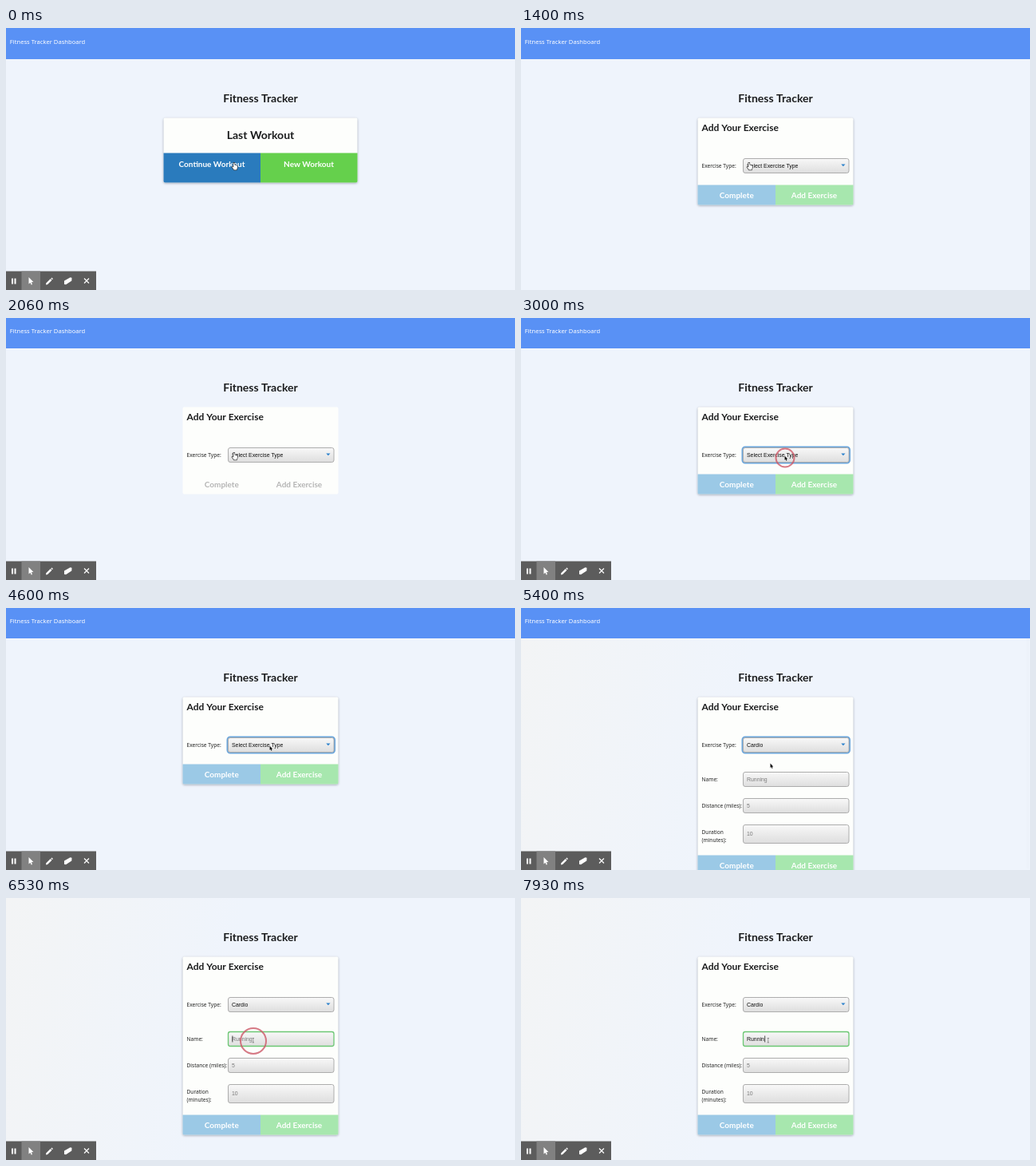
An HTML page with a canvas that plays this animation: 638 by 328 pixels, repeating every 8 s.

```html
<!DOCTYPE html>
<html lang="en">
<head>
<meta charset="utf-8">
<title>Fitness Tracker</title>
<style>
  html, body { margin: 0; width: 100%; height: 100%; overflow: hidden; background: #eff4fc; }
  canvas { display: block; width: 638px; height: 328px; }
</style>
</head>
<body>
<canvas id="stage" width="638" height="328"></canvas>
<script>
const LOOP = 8000;
const LATO = 'Lato, sans-serif';
const LABEL = '"Noto Sans", sans-serif';
const FIELD = '"Liberation Sans", Arial, sans-serif';

// Moments of the story, in ms
const EXERCISE_PAGE = 1330, RELOAD = 2060, FOCUS_SELECT = 2930, PICK_CARDIO = 4860,
      SCROLL = 5400, FOCUS_NAME = 6400;
const KEYS = [7000, 7200, 7400, 7530, 7730, 7860];
const CLICKS = [[720, 287, 173], [FOCUS_SELECT, 331, 175], [FOCUS_NAME, 310, 179]];

const canvas = document.getElementById('stage');
const ctx = canvas.getContext('2d');

const clamp01 = v => Math.max(0, Math.min(1, v));
const progress = (t, from, to) => clamp01((t - from) / (to - from));
const ease = p => p * p * (3 - 2 * p);
const mix = (a, b, p) => a + (b - a) * p;

function rect(x, y, w, h, fill) {
  ctx.fillStyle = fill;
  ctx.fillRect(x, y, w, h);
}

function rounded(x, y, w, h, r) {
  ctx.beginPath();
  ctx.roundRect(x, y, w, h, r);
}

function poly(points, fill, stroke, width = 1) {
  ctx.beginPath();
  points.forEach(([x, y]) => ctx.lineTo(x, y));
  ctx.closePath();
  if (stroke) {
    ctx.strokeStyle = stroke;
    ctx.lineWidth = width;
    ctx.stroke();
  }
  if (fill) {
    ctx.fillStyle = fill;
    ctx.fill();
  }
}

// Draws text whose capitals are centred on y
function text(str, x, y, size, family, color, { weight = 400, align = 'left' } = {}) {
  ctx.font = `${weight} ${size}px ${family}`;
  ctx.textAlign = align;
  ctx.fillStyle = color;
  ctx.fillText(str, x, y + size * 0.36);
}

const heading = (str, x, y, size, color = '#1b1c1d', align = 'center') =>
  text(str, x, y, size, LATO, color, { weight: 700, align });

function card(x, y, w, h, shadow) {
  ctx.save();
  if (shadow > 0) {
    ctx.shadowColor = `rgba(60,70,90,${0.45 * shadow})`;
    ctx.shadowBlur = 3;
    ctx.shadowOffsetY = 1;
  }
  rounded(x, y, w, h, 2);
  ctx.fillStyle = '#fdfefc';
  ctx.fill();
  ctx.restore();
}

function buttonPair(x, y, w, h, left, right) {
  ctx.fillStyle = left;
  rounded(x, y, w / 2, h, [0, 0, 0, 2]);
  ctx.fill();
  ctx.fillStyle = right;
  rounded(x + w / 2, y, w / 2, h, [0, 0, 2, 0]);
  ctx.fill();
}

function field(y, h, value, color, focus) {
  const x = 278.5, w = 132.5;
  if (focus === 'blue') {
    rounded(x - 1, y - 1, w + 2, h + 2, 3.5);
    ctx.strokeStyle = '#6ba6dc';
    ctx.lineWidth = 2;
    ctx.stroke();
  }
  const shade = ctx.createLinearGradient(0, y, 0, y + h);
  shade.addColorStop(0, '#f8f8f8');
  shade.addColorStop(1, '#dedede');
  rounded(x, y, w, h, 2.5);
  ctx.fillStyle = shade;
  ctx.fill();
  ctx.strokeStyle = focus === 'green' ? '#6cc774' : '#adadad';
  ctx.lineWidth = focus === 'green' ? 1.3 : 1;
  ctx.stroke();
  text(value, 283, y + h / 2, 6.9, FIELD, color);
}

const label = (str, y) => text(str, 226.5, y, 6.6, LABEL, '#222');

function homePage() {
  card(197.5, 112.5, 243, 81, 1);
  heading('Last Workout', 319, 133.5, 14);
  buttonPair(197.5, 156.5, 243, 37, '#2a7bbd', '#65d04c');
  heading('Continue Workout', 258, 170, 10, '#fff');
  heading('New Workout', 379.5, 170, 10, '#fff');
}

function cardioFields(t) {
  const typed = 'Runnin'.slice(0, KEYS.filter(k => t >= k).length);
  const active = t >= FOCUS_NAME;
  label('Name:', 216);
  field(206.5, 18, typed || 'Running', typed ? '#111' : '#7b7b7b', active && 'green');
  if (active) {
    const caret = 283.5 + ctx.measureText(typed).width;
    rect(caret, 211.5, 0.8, 8, '#222');
  }
  label('Distance (miles):', 249);
  field(239.5, 18, '5', '#7b7b7b');
  label('Duration', 282);
  label('(minutes):', 291.5);
  field(272.5, 23, '10', '#7b7b7b');
}

function exercisePage(t) {
  const cardio = t >= PICK_CARDIO;
  const styled = t < RELOAD ? 1 : progress(t, 2130, 2300);
  const top = cardio ? 310.5 : 196.5;
  card(221.5, 112.5, 195, top + 25 - 112.5, styled);
  heading('Add Your Exercise', 226.5, 124.5, 12, '#1b1c1d', 'left');

  label('Exercise Type:', 172.5);
  const focused = t >= FOCUS_SELECT && t < FOCUS_NAME;
  field(163.5, 18, cardio ? 'Cardio' : 'Select Exercise Type', '#111', focused && 'blue');
  poly([[401.3, 170.4], [406.5, 170.4], [403.9, 173.3]], '#2c82cc');
  if (cardio) cardioFields(t);

  ctx.globalAlpha = styled;
  buttonPair(221.5, top, 195, 25, '#9bc9e6', '#a7e7ae');
  ctx.globalAlpha = 1;
  const shade = Math.round(mix(181, 255, styled));
  const ink = `rgb(${shade},${shade},${shade})`;
  heading('Complete', 270.3, top + 12.7, 10, ink);
  heading('Add Exercise', 367.5, top + 12.7, 10, ink);
}

function pageOffset(t) {
  if (t < RELOAD) return 0;
  const down = ease(progress(t, SCROLL, 5570));
  const settle = ease(progress(t, 5800, 6150));
  return -1 - 40 * down + 2 * settle;
}

function toolbar(y) {
  rect(0, y, 113, 24, '#5c5c5c');
  rect(19.5, y, 23.5, 24, '#818181');
  ctx.save();
  ctx.translate(0, y + 12);
  rect(7, -3, 2, 7, '#fff');
  rect(10.5, -3, 2, 7, '#fff');
  poly([[28.5, -4.5], [28.5, 4], [30.4, 2.3], [31.7, 5], [33, 4.4], [31.8, 1.8], [34.4, 1.6]], '#fff');
  poly([[50, 5], [50.4, 2.7], [55.7, -2.5], [57.5, -0.7], [52.2, 4.6]], '#fff');
  poly([[56.3, -3.1], [57.4, -4.1], [59, -2.5], [58, -1.4]], '#fff');
  poly([[73, 0], [80.5, -4.3], [82.5, -3.8], [82.3, 0], [75, 4.8], [73, 4.3]], '#fff');
  ctx.strokeStyle = '#fff';
  ctx.lineWidth = 1.2;
  ctx.beginPath();
  ctx.moveTo(98, -3); ctx.lineTo(104, 3);
  ctx.moveTo(104, -3); ctx.lineTo(98, 3);
  ctx.stroke();
  ctx.restore();
}

function scrollbar(t) {
  const alpha = progress(t, SCROLL, 5460) * (1 - progress(t, 6260, 6480));
  if (!alpha) return;
  ctx.globalAlpha = alpha;
  rounded(633.7, 36, 3.3, 290.5, 1.6);
  ctx.fillStyle = '#808285';
  ctx.fill();
  ctx.globalAlpha = 1;
}

function pointer(t) {
  const toSelect = ease(progress(t, 2660, 2900));
  const toOption = ease(progress(t, PICK_CARDIO, 5000));
  const toName = ease(progress(t, 6260, 6390));
  const x = 287 + 44 * toSelect - 18 * toOption - 3.2 * toName;
  const y = 173 + toSelect + 22 * toOption - 18 * toName;
  ctx.save();
  ctx.translate(x, y);
  if (t < 2660) {
    poly([[-1.8, -4], [-0.6, -4], [-0.3, -1.4], [2.8, -0.6], [3, 1.7], [2, 4.5],
          [-1.2, 4.5], [-3.6, 1], [-2.9, 0.4], [-1.6, 1.4]], '#fff', '#333', 1.3);
  } else if (toName < 0.6) {
    poly([[-0.5, -1.5], [-0.5, 4], [0.7, 3], [1.6, 5], [2.5, 4.6], [1.7, 2.7], [3.2, 2.5]],
         '#111', '#fff', 1);
  } else {
    rect(-1.2, -3, 2.4, 0.8, '#777');
    rect(-0.4, -2.5, 0.8, 5.5, '#888');
    rect(-1.2, 2.5, 2.4, 0.8, '#777');
  }
  ctx.restore();
}

function clickRing(t, [start, x, y]) {
  const age = t - start;
  if (age < 0 || age > 400) return;
  ctx.globalAlpha = 0.8 * (1 - progress(age, 200, 400));
  ctx.beginPath();
  ctx.arc(x, y, mix(5, 16, progress(age, 0, 120)), 0, Math.PI * 2);
  ctx.strokeStyle = '#ce5968';
  ctx.lineWidth = 2;
  ctx.stroke();
  ctx.globalAlpha = 1;
}

function background(t) {
  const wash = ctx.createLinearGradient(0, 0, 290, 60);
  wash.addColorStop(0, t >= SCROLL ? '#f3f4f5' : '#eff4fc');
  wash.addColorStop(1, '#eff4fc');
  rect(0, 0, 638, 328, wash);
}

function draw(t) {
  background(t);
  const offset = pageOffset(t);
  ctx.save();
  ctx.translate(0, offset);
  rect(0, 0, 638, 39, '#5991f5');
  text('Fitness Tracker Dashboard', 4.8, 17.5, 7.6, LABEL, '#fff');
  heading('Fitness Tracker', 319, 87.5, 14);
  if (t < EXERCISE_PAGE) homePage();
  else exercisePage(t);
  ctx.restore();

  scrollbar(t);
  // The overlay rides along with the overscroll bounce
  const bounce = Math.min(0, offset + 39);
  if (bounce < 0) rect(0, 328 + bounce, 638, -bounce, '#fafbfd');
  if (t < EXERCISE_PAGE || t >= RELOAD) toolbar(304.5 + bounce);
  CLICKS.forEach(click => clickRing(t, click));
  pointer(t);
}

function frame() {
  draw(performance.now() % LOOP);
  requestAnimationFrame(frame);
}
frame();
</script>
</body>
</html>
```
